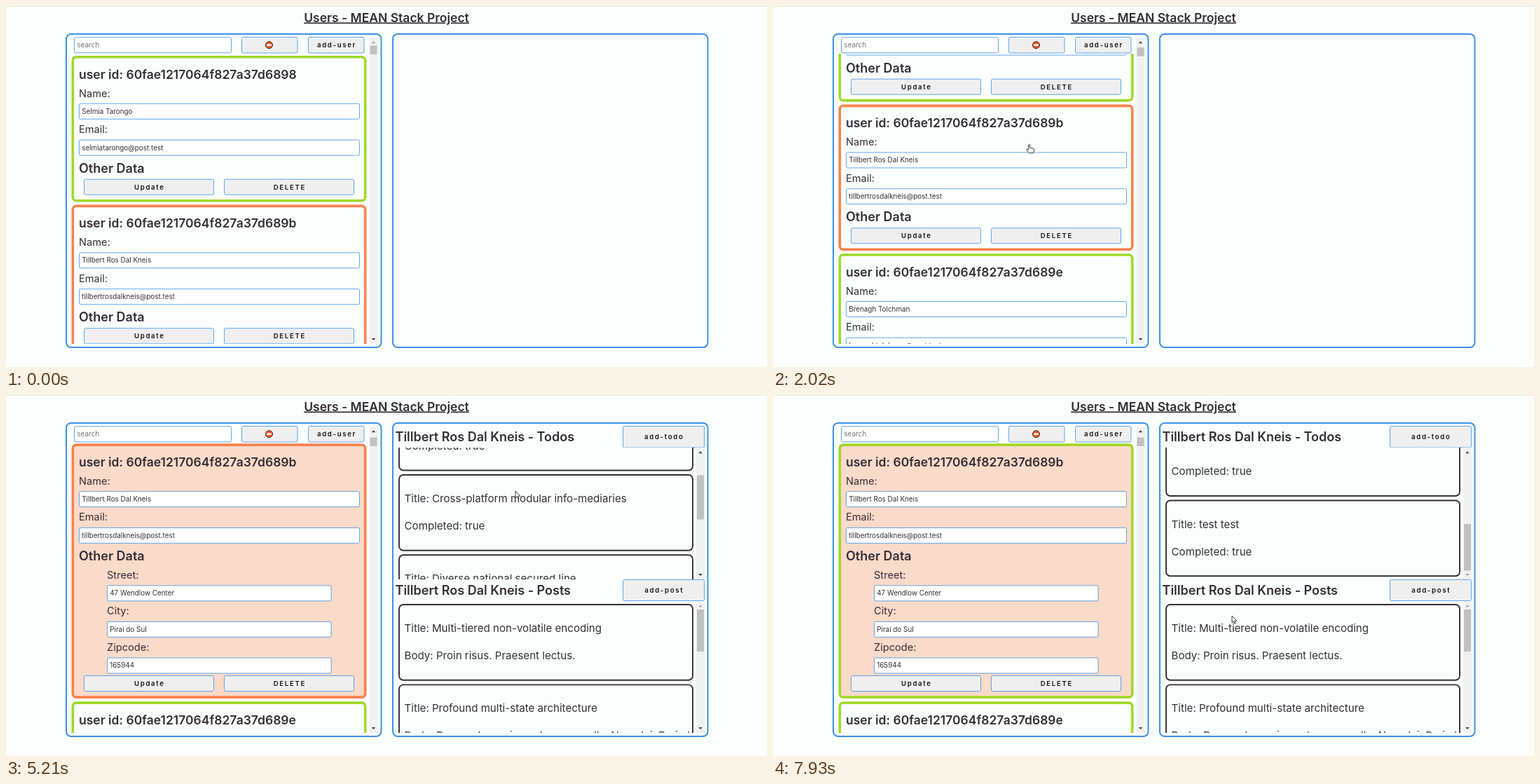
An HTML page that plays this animation: 1086x515 px, repeating every 7.99 s.

```html
<!DOCTYPE html>
<html lang="en">
<head>
<meta charset="utf-8">
<title>Users</title>
<style>
  html, body { margin: 0; width: 100%; height: 100%; overflow: hidden; background: #fafffd; }
  svg { display: block; width: 1086px; height: 515px; }
  text { font-family: Inter, "Open Sans", sans-serif; fill: #342e37; white-space: pre; }
  .title { font-size: 17.5px; font-weight: 600; text-anchor: middle; text-decoration: underline; text-decoration-thickness: 1.5px; }
  .head { font-size: 18px; font-weight: 600; }
  .id { font-size: 17.5px; font-weight: 600; }
  .label { font-size: 14.6px; }
  .note { font-size: 15.1px; }
  .value { font-size: 9.9px; }
  .hint { font-size: 10px; fill: #757575; }
  .btn { font-size: 9.6px; font-weight: 600; letter-spacing: 1.7px; text-anchor: middle; fill: #16131a; }
</style>
</head>
<body>
<svg id="stage" viewBox="0 0 1086 515">
  <defs>
    <clipPath id="usersClip"><rect x="90" y="68" width="428" height="414"/></clipPath>
    <clipPath id="todosClip"><rect x="554" y="75" width="430" height="188"/></clipPath>
    <clipPath id="postsClip"><rect x="554" y="294" width="430" height="188"/></clipPath>
  </defs>
  <g id="base"></g>
  <g id="users" clip-path="url(#usersClip)"></g>
  <g id="detail"></g>
  <g id="bars"></g>
  <g id="pointer"></g>
</svg>
<script>
const LOOP = 7990;
const INK = '#342e37', BLUE = '#3c91e6', GREEN = '#a2d729', CORAL = '#fa824c', PAPER = '#fafffd';
const OWNER = 'Tillbert Ros Dal Kneis';
const EXPAND_AT = 2620, OPEN_AT = 4120, DONE_AT = 7250;
const CLICKS = [[2480, EXPAND_AT], [3980, OPEN_AT], [7120, DONE_AT]];

const USERS = [
  { id: '60fae1217064f827a37d6898', name: 'Selmia Tarongo', email: 'selmiatarongo@post.test' },
  { id: '60fae1217064f827a37d689b', name: OWNER, email: 'tillbertrosdalkneis@post.test' },
  { id: '60fae1217064f827a37d689e', name: 'Brenagh Tolchman', email: 'brenaghtolchman@post.test' }
];
const ADDRESS = [['Street:', '47 Wendlow Center'], ['City:', 'Piraí do Sul'], ['Zipcode:', '165944']];
const TODOS = ['Open-source global help-desk', 'Cross-platform modular info-mediaries',
  'Diverse national secured line', 'test test'];
const POSTS = [
  ['Multi-tiered non-volatile encoding', 'Proin risus. Praesent lectus.'],
  ['Profound multi-state architecture', 'Donec ut mauris eget massa nulla. Nam dui. Proin l']
];

// Keyframes: [time, value...]
const USER_SCROLL = [[1180, 0], [1320, 62], [1400, 72], [1470, 100.5], [1550, 136], [1640, 143], [3260, 143], [3460, 214.3]];
const TODO_SCROLL = [[4980, 0], [5210, 79.8], [5450, 205], [5690, 293.5], [5860, 298]];
const PATH = [
  [320, 966, 516], [1070, 439, 214], [1470, 422, 212], [1880, 404, 176], [2450, 154, 313],
  [2890, 154, 313], [2960, 154, 314], [3640, 206.5, 97], [4320, 206.5, 97], [4980, 727, 134],
  [5210, 727, 137], [5690, 727, 140], [5960, 727, 140], [6520, 670, 234], [7850, 670, 234], [7930, 655, 315]
];

const $ = id => document.getElementById(id);
const smooth = u => u * u * (3 - 2 * u);

function sample(keys, t, ease = u => u) {
  if (t <= keys[0][0]) return keys[0].slice(1);
  for (let i = 1; i < keys.length; i++) {
    const a = keys[i - 1], b = keys[i];
    if (t < b[0]) {
      const u = ease((t - a[0]) / (b[0] - a[0]));
      return a.slice(1).map((v, k) => v + (b[k + 1] - v) * u);
    }
  }
  return keys[keys.length - 1].slice(1);
}

const text = (cls, x, y, s) => `<text class="${cls}" x="${x}" y="${y}">${s}</text>`;
const rect = (x, y, w, h, fill, stroke = 'none', sw = 1, r = 0) =>
  `<rect x="${x}" y="${y}" width="${w}" height="${h}" rx="${r}" fill="${fill}" stroke="${stroke}" stroke-width="${sw}"/>`;
const panel = x => rect(x, 40, 449.5, 447, PAPER, BLUE, 2, 7);
const field = (x, y, w, s, cls = 'value') => rect(x + .5, y + .5, w - 1, 22, '#fff', BLUE, .8, 2) + text(cls, x + 4.2, y + 14.9, s);
const button = (x, y, w, h, s) =>
  rect(x + .5, y + .5, w - 1, h - 1, '#efefef', BLUE, .8, 2) + text('btn', x + w / 2 + .8, y + h / 2 + 3.4, s);
const group = (y, body) => `<g transform="translate(0 ${y})">${body}</g>`;

function userCard(user, { border, tint, open }) {
  const shift = open ? 155 : 0;
  let out = rect(95.3, 1.8, 417.4, 205 + shift, tint ? '#fadac8' : PAPER, border, 3.6, 5)
    + text('id', 104, 32.5, 'user id: ' + user.id)
    + text('label', 104, 58.5, 'Name:') + field(104, 67.8, 401, user.name)
    + text('label', 104, 110.2, 'Email:') + field(104, 119.6, 401, user.email)
    + text('head', 104, 166.7, 'Other Data');
  if (open) ADDRESS.forEach(([label, value], i) => {
    out += text('label', 144, 192.5 + i * 51.6, label) + field(144, 202 + i * 51.6, 320.5, value);
  });
  return out + button(111, 175.7 + shift, 186, 23, 'Update') + button(311, 175.7 + shift, 186, 23, 'DELETE');
}

function userList(t, scroll) {
  const open = t >= EXPAND_AT, done = t >= DONE_AT, tint = t >= OPEN_AT;
  let y = 71 - scroll;
  return USERS.map((user, i) => {
    const second = i === 1;
    const card = group(y, userCard(user, {
      border: second && !done ? CORAL : GREEN, tint: second && tint, open: second && open
    }));
    y += 212.6 + (second && open ? 155.4 : 0);
    return card;
  }).join('');
}

const noteCard = (y, h, title, line) => group(y,
  rect(561, 1, 419, h - 2, PAPER, INK, 1.9, 6)
  + text('note', 568.6, 40, 'Title: ' + title) + text('note', 568.6, 79, line));

function detailPanel(t, scroll) {
  const done = t >= DONE_AT;
  const todos = TODOS.map((title, i) => {
    const y = 79 + i * 114.3 - scroll, pending = i === 3 && !done;
    return noteCard(y, pending ? 135.5 : 109.8, title, 'Completed: ' + !pending)
      + (pending ? button(569, y + 103.5, 129, 23, 'Mark as Completed') : '');
  }).join('');
  const posts = POSTS.map(([title, body], i) => noteCard(298 + i * 114.4, 109.8, title, 'Body: ' + body)).join('');
  return text('head', 555.5, 66.2, OWNER + ' - Todos') + button(880, 44, 117, 31.5, 'add-todo')
    + `<g clip-path="url(#todosClip)">${todos}</g>`
    + text('head', 555.5, 285, OWNER + ' - Posts') + button(880, 263, 117, 31, 'add-post')
    + `<g clip-path="url(#postsClip)">${posts}</g>`;
}

function scrollbar(x, top, bottom, thumbY, thumbH, atTop, atEnd) {
  const c = x + 6;
  const arrow = (y, d, off) => `<path d="M${c - 2.8} ${y + d * 1.5}h5.6l-2.8 ${-d * 3}z" fill="${off ? '#a3a3a3' : '#404040'}"/>`;
  return rect(x, top, 12, bottom - top, '#f1f1f1') + rect(x + 1, thumbY, 10, thumbH, '#c1c1c1')
    + arrow(top + 6.7, 1, atTop) + arrow(bottom - 6.5, -1, atEnd);
}

function pointer(t, x, y) {
  const overCard = x > 93 && x < 515;
  const overButton = t < DONE_AT && x > 569 && x < 698 && y > 231;
  const clicked = CLICKS.some(([a, b]) => t >= a && t < b);
  const shape = overCard || overButton
    ? 'M-1 1Q0-.6 1 1V5.2l5 1.1q1 .3 1 1.5l-1.1 4.9H-.2L-3.8 8.5q-.5-1 .5-1.4.8-.2 1.4.5l.9.9z'
    : 'M0 0V9.8L2.2 7.8 3.8 11.2 5.2 10.5 3.7 7.2H6.8z';
  return (clicked ? `<circle cx="${x}" cy="${y + .5}" r="8" fill="#f2e51d" style="mix-blend-mode:multiply"/>` : '')
    + `<path transform="translate(${x} ${y})" d="${shape}" fill="#fff" stroke="#222" stroke-width=".9" stroke-linejoin="round"/>`;
}

$('base').innerHTML = rect(0, 0, 1086, 515, PAPER) + rect(0, 0, 1086, 1, '#e4e8e7')
  + text('title', 543, 22.5, 'Users - MEAN Stack Project')
  + panel(86) + panel(552)
  + field(97, 44.3, 225, 'search', 'hint')
  + button(336, 44, 80.5, 23.5, '') + button(431, 44, 80.5, 23.5, 'add-user')
  + `<circle cx="375.5" cy="55.7" r="5" fill="#ee5a2b" stroke="#3a2420" stroke-width="1"/>` + rect(372.2, 54.5, 6.6, 2.4, '#fff');

function draw(t) {
  const [userScroll] = sample(USER_SCROLL, t);
  let [todoScroll] = sample(TODO_SCROLL, t);
  const done = t >= DONE_AT, open = t >= OPEN_AT;
  if (done) todoScroll = 272.4;
  $('users').innerHTML = userList(t, userScroll);
  $('detail').innerHTML = open ? detailPanel(t, todoScroll) : '';
  let bars = scrollbar(518.5, 45, 482, 56.6 + userScroll * .0185, 12.4, userScroll === 0, false);
  if (open) {
    const content = done ? 460.4 : 486, track = 163;
    bars += scrollbar(985, 75, 263, 87.5 + todoScroll / content * track, 188 / content * track,
      todoScroll === 0, todoScroll >= content - 188.1)
      + scrollbar(985, 294, 482, 306, 60, true, false);
  }
  $('bars').innerHTML = bars;
  $('pointer').innerHTML = t < 320 ? '' : pointer(t, ...sample(PATH, t, smooth));
}

const start = performance.now();
function tick(now) {
  draw(Math.max(0, now - start) % LOOP);
  requestAnimationFrame(tick);
}
draw(0);
requestAnimationFrame(tick);
</script>
</body>
</html>
```
